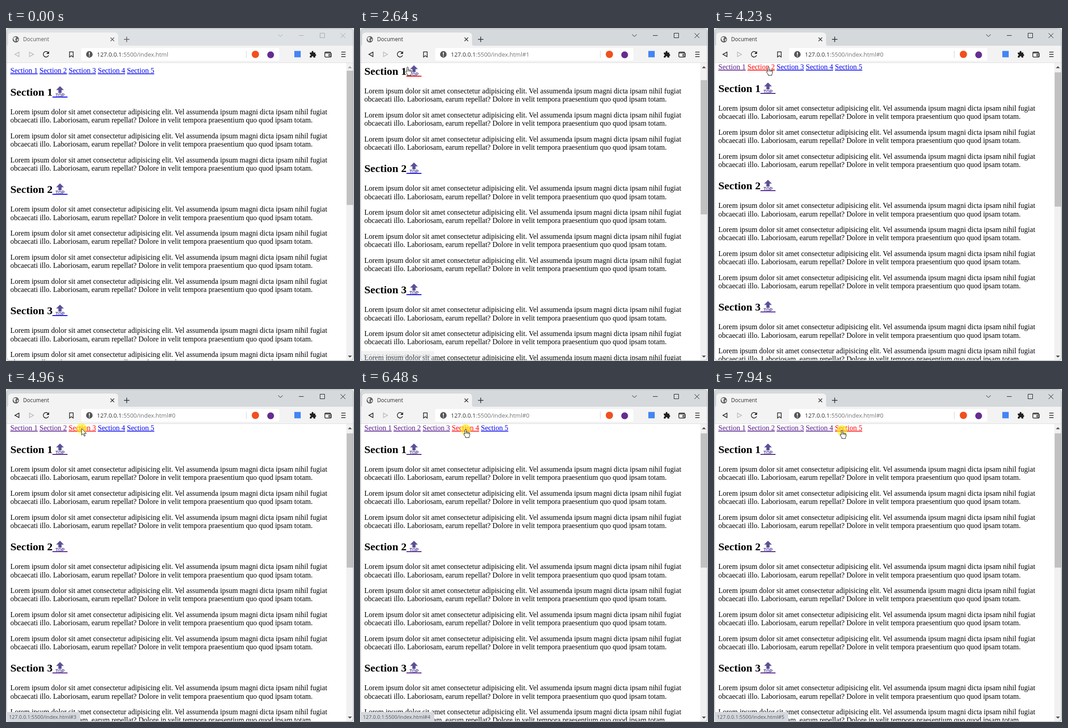
Write an HTML page that moves like this. It is 764 by 733 pixels and loops after 8 s.

```html
<!DOCTYPE html>
<html lang="en">
<head>
<meta charset="utf-8">
<title>Document</title>
<style>
html, body { margin: 0; width: 100%; height: 100%; overflow: hidden; }
svg { display: block; }
.page { font: 16px "Liberation Serif", "Times New Roman", serif; }
.page .head { font-weight: bold; font-size: 24px; }
.page .top { font: bold 10.5px Roboto, sans-serif; fill: #5b5199; }
.link { text-decoration: underline; }
.ui { font-family: "Open Sans", sans-serif; }
.line { fill: none; stroke: #222; stroke-width: 1.5; }
</style>
</head>
<body>
<svg id="stage" width="764" height="733" viewBox="0 0 764 733">
  <rect width="764" height="733" fill="#e3e5e7"/>
  <rect x="1.5" y="1.5" width="761" height="730.5" rx="7" fill="#fff"/>
  <svg x="2" y="77" width="745" height="654" viewBox="2 77 745 654">
    <g id="page" class="page"></g>
  </svg>

  <!-- scrollbar -->
  <path d="M747 77H762V725Q762 731 756 731H747Z" fill="#f1f1f1"/>
  <rect id="thumb" x="748" width="14" height="295.5" fill="#c1c1c1"/>
  <path id="up" d="M750.5 88.5L755 84L759.5 88.5Z"/>
  <path id="down" d="M750.5 721L755 725.5L759.5 721Z"/>

  <!-- title bar -->
  <path id="bar" d="M2 39V9Q2 2 9 2H755Q762 2 762 9V39Z"/>
  <path d="M2 39Q5 39 5 35V18Q5 10 13 10H238Q246 10 246 18V35Q246 39 250 39H762V77H2Z" fill="#f3f3f3"/>
  <path d="M2 76.5H762" stroke="#dcdcdc"/>
  <circle cx="21.5" cy="25" r="7" fill="#5f6368"/>
  <path d="M16 22L20 19.5L23 21.5L20 24.5L21.5 27L20 30L17 26ZM24 25L27 24L26 28.5L23.5 28Z" fill="#f3f3f3"/>
  <g id="title">
    <text class="ui" x="37.5" y="29" font-size="11.7" fill="currentColor">Document</text>
    <path d="M229.5 21L237.5 29M237.5 21L229.5 29M259 25H271M265 19V31" stroke="currentColor" stroke-width="1.5"/>
  </g>
  <path id="buttons" d="M597.5 14L602.5 19L607.5 14M643 16.5H653.5M689.5 11.5H699.5V21.5H689.5ZM734.5 11.5L745 22M745 11.5L734.5 22" fill="none"/>

  <!-- toolbar -->
  <path id="back" class="line" d="M28.5 53V63L19.5 58Z"/>
  <path class="line" d="M51.5 53V63L60.5 58Z" style="stroke:#bbb"/>
  <path class="line" d="M92.5 54A6 6 0 1 0 93.5 60"/>
  <path d="M94.5 51V57H88.5Z" fill="#222"/>
  <path class="line" d="M139.5 52.5H147.5V64L143.5 61L139.5 64Z"/>
  <rect x="165" y="44" width="435" height="28" rx="4" fill="#fff"/>
  <circle cx="183" cy="58" r="7.2" fill="#55575b"/>
  <path d="M183 53.5V59M183 60.5V62.5" stroke="#fff" stroke-width="2"/>
  <text class="ui" x="199.5" y="63" font-size="12.95" fill="#303236">127.0.0.1<tspan fill="#707276">:5500/index.html<tspan id="hash"></tspan></tspan></text>
  <path d="M527.5 50V66" stroke="#cfcfcf"/>
  <circle cx="547.5" cy="58" r="8" fill="#f0501e"/>
  <circle cx="581" cy="59" r="7.5" fill="#662d91"/>
  <rect x="633" y="50.5" width="14" height="14" fill="#4285f4"/>
  <path d="M667 54H671V52.5A2 2 0 0 1 675 52.5V54H679V57.5A2 2 0 0 1 679 61.5V65H675V64A2 2 0 0 0 671 64V65H667V61.5A2 2 0 0 0 667 57.5Z" fill="#222"/>
  <path class="line" d="M712 54.5V53H702Q700 53 700 55V62Q700 64 702 64H712Q714 64 714 62V56.5Q714 55 712 55H701M714 58H709V61.5H714"/>
  <path class="line" d="M736 53H745.5M736 58H745.5M736 63H745.5"/>
  <rect x="1.5" y="1.5" width="761" height="730.5" rx="7" fill="none" stroke="#a6a9ac"/>

  <g id="status">
    <path d="M1 711H159Q163 711 163 715V732.5H7Q1 732 1 727Z" fill="#d5d9dd"/>
    <text id="statusText" class="ui" x="6.5" y="726" font-size="11.1" fill="#505357"></text>
  </g>
  <g id="cursor">
    <circle id="spot" r="11.5" fill="#fff000"/>
    <path id="pointer" fill="#fff" stroke="#111" stroke-linejoin="round"/>
  </g>
</svg>
<script>
const LOOP = 8000, END = 721, BLUE = "#0000ee", PURPLE = "#551a8b", RED = "#ff0000";
const $ = id => document.getElementById(id);
const set = (el, attrs) => { for (const k in attrs) el.setAttribute(k, attrs[k]); };
const clamp = v => Math.max(0, Math.min(1, v));

const LINES = [
  "Lorem ipsum dolor sit amet consectetur adipisicing elit. Vel assumenda ipsum magni dicta ipsam nihil fugiat",
  "obcaecati illo. Laboriosam, earum repellat? Dolore in velit tempora praesentium quo quod ipsam totam."
];
const COUNTS = [3, 4, 3, 7, 3];
const heads = [];
const ARROW = "M0 0V14.5L3.4 11.5L5.7 16.8L8 15.8L5.7 10.7H10.3Z";
const HAND = "M-1.5 10V1.2Q-1.5-.3 0-.3T1.5 1.2V6Q3 5 4.2 6.5Q5.8 5.6 6.8 7.2Q9 6.6 9 9V12Q9 14 7.6 15.5V18H-.5V16L-4 11Q-4.5 9-3 8.8Z" +
  "M1.5 6V9.5M4.2 6.5V10M6.8 7.2V10.5";

function buildPage() {
  let html = "", y = 149;
  const text = (x, y, s, cls = "") => `<text x="${x}" y="${Math.round(y)}" class="${cls}">${s}</text>`;
  COUNTS.forEach((_, i) => html += text(9.5 + 64 * i, 99, `Section ${i + 1}`, "link"));
  COUNTS.forEach((count, i) => {
    const h = Math.round(y);
    heads.push(h);
    html += text(9.5, h, `Section ${i + 1}`, "head") +
      `<rect class="rule" x="102" y="${h + 2}" width="33" height="2"/>` +
      `<path d="M118.5 ${h - 21}l8.5 8.5h-5v6.5h-7v-6.5h-5z" fill="#5b5199"/>` +
      text(108.5, h + 3, "TOP", "top");
    for (let p = 0; p < count; p++)
      LINES.forEach((s, n) => html += text(9.5, y + 41 + p * 52.8 + n * 18.4, s));
    y += count * 52.8 + 55.8;
  });
  $("page").innerHTML = html;
}
buildPage();
const links = [...document.querySelectorAll(".link")];
const rules = [...document.querySelectorAll(".rule")];

// time, scroll offset, address hash
const VIEWS = [[0, 0, ""], [1980, 46, "#1"], [2990, 8, "#0"], [3630, 260, "#2"], [4030, 8, "#0"],
  [5030, 527, "#3"], [5700, 8, "#0"], [6540, END, "#4"], [7280, 8, "#0"]];
// time, x, y of the cursor's hot spot
const PATH = [[590, 719, 291], [1380, 29, 91], [2240, 29, 91], [2700, 108, 86], [4100, 108, 86], [4560, 166, 87],
  [5030, 166, 87], [5400, 117, 94], [5860, 117, 94], [6280, 232, 89], [6600, 232, 89], [7080, 125, 117],
  [7320, 125, 117], [7780, 281, 91], [8000, 281, 91]];
const CLICKS = [[1840, 2050], [2850, 3030], [3500, 3630], [3900, 4030], [4900, 5030],
  [5560, 5700], [6410, 6540], [7200, 7280], [7880, 8000]];
// fade-in time, fade-out time, hash shown in the status bubble
const STATUS = [[1770, 1980, 1], [2560, 2990, 0], [3080, 3630, 2], [3770, 4030, 0], [4340, 5030, 3],
  [5240, 5560, 0], [5650, 5880, 2], [6100, 6540, 4], [7130, 7280, 0], [7620, 8200, 5]];

const latest = (list, t) => list.filter(e => e[0] <= t).pop();

function cursorAt(t) {
  const i = Math.max(1, PATH.findIndex(p => p[0] > t));
  const [t0, x0, y0] = PATH[i - 1], [t1, x1, y1] = PATH[i];
  let k = clamp((t - t0) / (t1 - t0));
  k = k * k * (3 - 2 * k);
  return [x0 + (x1 - x0) * k, y0 + (y1 - y0) * k];
}

function draw(t) {
  const [, scroll, hash] = latest(VIEWS, t);
  const active = t >= 1650;
  const [x, y] = cursorAt(t);
  const inLink = (i, bottom) => active && x >= 9.5 + 64 * i && x <= 69.5 + 64 * i &&
    y + scroll >= 85 && y + scroll < bottom;
  const inTop = h => active && x >= 102 && x <= 135 && y + scroll >= h - 26 && y + scroll <= h + 6;

  set($("page"), { transform: `translate(0 ${-scroll})` });
  links.forEach((el, i) => {
    const visited = VIEWS.some(v => v[0] <= t && v[2] === "#" + (i + 1));
    set(el, { fill: inLink(i, 102) ? RED : visited ? PURPLE : BLUE });
  });
  rules.forEach((el, i) => set(el, { fill: inTop(heads[i]) ? RED : t >= 2990 ? PURPLE : BLUE }));

  set($("thumb"), { y: 94 + scroll * 0.4515 });
  set($("up"), { fill: scroll ? "#505050" : "#a3a3a3" });
  set($("down"), { fill: scroll < END ? "#505050" : "#a3a3a3" });
  set($("bar"), { fill: active ? "#d5d9dc" : "#dee1e4" });
  set($("title"), { color: active ? "#2b2d30" : "#55585c" });
  set($("buttons"), { stroke: active ? "#111" : "#a0a2a5" });
  $("back").style.stroke = t >= 1980 ? "#222" : "#bbb";
  $("hash").textContent = hash;

  const [from, to, id] = latest(STATUS, t) || [LOOP, LOOP, 0];
  set($("status"), { opacity: clamp((t - from) / 230) * clamp(1 - (t - to) / 130) });
  $("statusText").textContent = "127.0.0.1:5500/index.html#" + id;

  const busy = t > 4900 && t < 5030;
  const hand = !busy && (links.some((_, i) => inLink(i, 105)) || heads.some(inTop));
  set($("cursor"), { transform: `translate(${x} ${y})`, visibility: t < 590 ? "hidden" : "visible" });
  set($("pointer"), { d: hand ? HAND : ARROW });
  set($("spot"), { opacity: CLICKS.some(([a, b]) => t >= a && t < b) ? 0.6 : 0 });
}

const start = performance.now();
function tick() {
  draw((performance.now() - start) % LOOP);
  requestAnimationFrame(tick);
}
tick();
</script>
</body>
</html>
```
